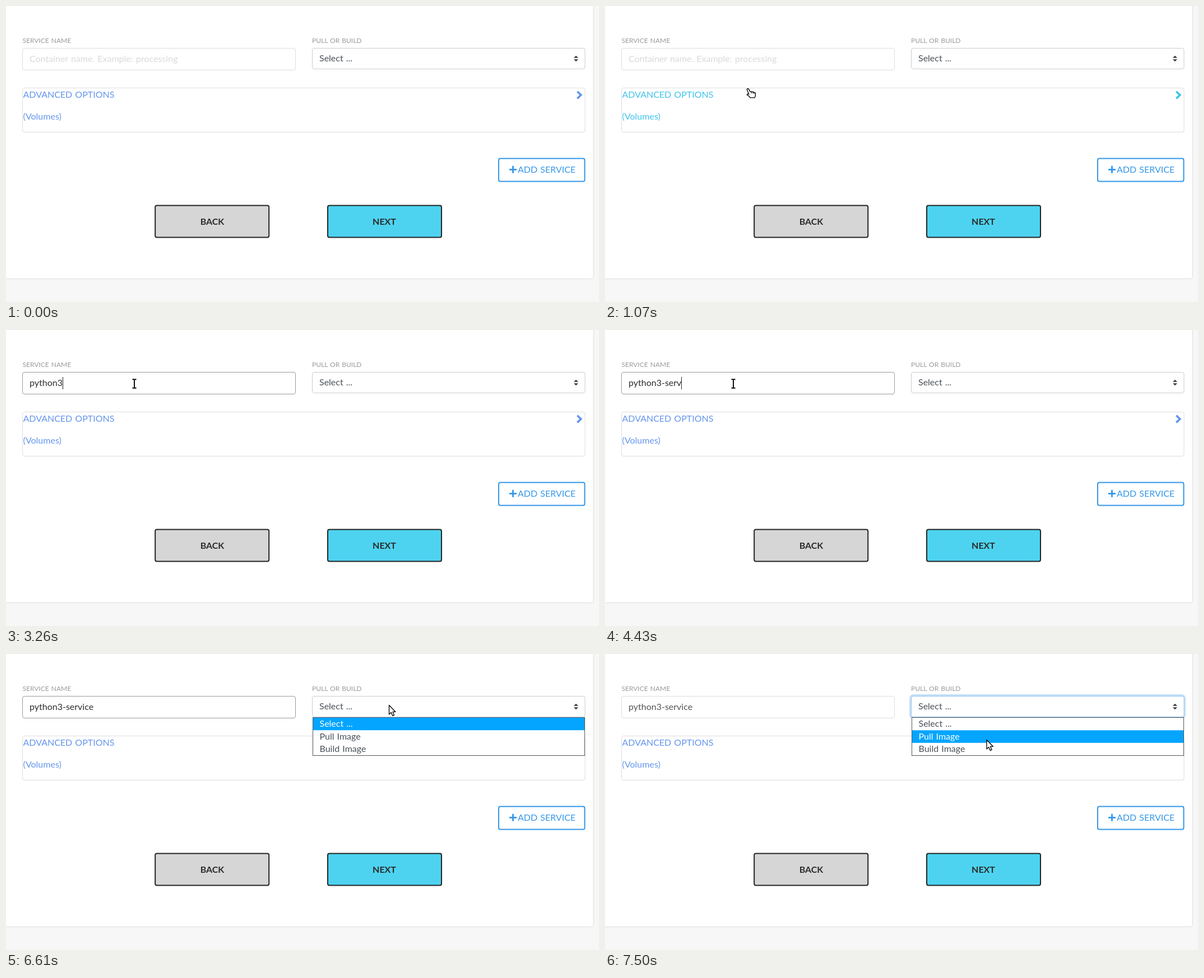
Write an HTML page that moves like this. It is 1058 px wide and 529 px high and loops after 8 s.

```html
<!DOCTYPE html>
<html lang="en">
<head>
<meta charset="utf-8">
<title>Service form</title>
<style>
  html, body { margin: 0; width: 100%; height: 100%; overflow: hidden; background: #f7f7f7; }
  svg { display: block; width: 1058px; height: 529px; }
  text { font: 16px Lato, "Open Sans", sans-serif; word-spacing: 1px; white-space: pre; fill: #495057; }
  .label { font-size: 12px; fill: #9a9a9a; }
  .bold { font-weight: 700; fill: #2b2b2b; text-anchor: middle; }
  .box { fill: #fff; stroke: #ddd; }
  .button { stroke: #242424; stroke-width: 2; }
  .blue { fill: #3498e8; }
  .line { fill: none; stroke: #3498e8; stroke-width: 2; }
  #link { color: #6495ed; }
  #link text { fill: currentColor; }
  #link path { fill: none; stroke: currentColor; stroke-width: 3.6; }
  #hand path, #arrow path { fill: #fff; stroke: #000; stroke-width: 1.3; stroke-linejoin: round; }
</style>
</head>
<body>
<svg viewBox="0 0 1058 529">
  <rect class="box" x="-10" y="-10" width="1058.5" height="497.5" rx="4"/>

  <text class="label" x="29.5" y="66">SERVICE NAME</text>
  <rect class="box" id="input" x="29.5" y="75.5" width="487" height="39" rx="3.5"/>
  <text id="hint" x="42" y="100" style="fill:#dadada">Container name. Example: processing</text>
  <text id="value" x="42" y="100"></text>
  <path id="squiggle" fill="none" stroke="#f03030"/>
  <rect id="caret" y="84" width="1" height="22" fill="#222"/>

  <text class="label" x="546" y="66">PULL OR BUILD</text>
  <rect id="ring" x="545" y="74" width="489" height="40" rx="5" fill="none" stroke="#3490dc" stroke-opacity=".28" stroke-width="4"/>
  <rect class="box" id="select" x="546.5" y="75.5" width="486.5" height="37" rx="3.5"/>
  <text x="559" y="99">Select ...</text>
  <path d="M1013 92.7 1017 88.8 1021 92.7ZM1013 95.3 1017 99.2 1021 95.3Z" fill="#343a40"/>

  <rect class="box" x="29.5" y="146.5" width="1003.5" height="79" rx="3.5"/>
  <g id="link">
    <text x="30.5" y="164">ADVANCED OPTIONS</text>
    <text x="30.5" y="203">(Volumes)</text>
    <path d="M1019.3 152.8 1025.8 159.1 1019.3 165.4"/>
  </g>

  <rect class="line" x="879" y="272.5" width="153.5" height="41" rx="3"/>
  <path class="line" style="stroke-width:2.8" d="M898 292.3H911M904.5 285.8V298.8"/>
  <text class="blue" style="fill:#3498e8" x="913" y="298">ADD SERVICE</text>

  <rect class="button" x="266.2" y="356.5" width="203" height="57" rx="3" fill="#d6d6d6"/>
  <text class="bold" x="368" y="390.5">BACK</text>
  <rect class="button" x="574" y="356.5" width="203" height="57" rx="3" fill="#4dd3f0"/>
  <text class="bold" x="675" y="390.5">NEXT</text>

  <g id="menu">
    <rect x="547.5" y="113.5" width="485" height="68" fill="#fff" stroke="#555"/>
    <rect id="mark" x="548" width="484" height="22.5" fill="#04a5ff"/>
    <text x="559.5" y="130">Select ...</text>
    <text x="559.5" y="152.5">Pull Image</text>
    <text x="559.5" y="175">Build Image</text>
  </g>

  <g id="arrow">
    <path d="M.5.5V16.8L4.2 13.4 6.9 19.4 9.6 18.2 7 12.3H11.8Z"/>
  </g>
  <g id="hand">
    <path d="M-2.5 1.2Q-2.4-.6-.6-.4L.8.6 3.3 5.4 6 5.2 8.5 5.6 11 6.4Q12.8 6.8 12.6 9V12.4L11.4 15.8H3.2L1.6 13.4-1.8 11.4Q-3.2 9.6-1.4 9.2L1 9.8Z"/>
    <path d="M6 5.4V8.4M8.7 6V8.8M11 7V9" style="stroke-width:1"/>
  </g>
  <g id="beam" fill="none">
    <path d="M-3.5-8H3.5M-3.5 8H3.5M0-8V8" stroke="#fff" stroke-width="4"/>
    <path d="M-3.5-7.8H-1L0-6.8 1-7.8H3.5M-3.5 7.8H-1L0 6.8 1 7.8H3.5M0-7V7" stroke="#000" stroke-width="1.9"/>
  </g>
</svg>
<script>
const LOOP = 8000;
const NAME = "python3-service";
const KEYS = [2600, 2670, 2790, 2930, 2990, 3130, 3260, 3750, 3940, 4130, 4190, 4430, 4500, 4590, 4880];
const CARET_ON = [[1340, 1880], [2600, 5480], [6060, 6610]];

// start, end, from, to, bend in y, easing
const MOVES = [
  [500, 1070, [1046, 452], [256, 148.5], 0, u => 1 - (1 - u) ** 1.7],
  [1070, 1290, [256, 148.5], [229, 95], 0, u => 1 - (1 - u) ** 2],
  [1880, 1881, [229, 95], [229, 96], 0, u => u],
  [5490, 5690, [229, 96], [683, 91], 34, u => u * u * (3 - 2 * u)],
  [7050, 7500, [683, 91], [680.5, 153], 0, u => u * u * (3 - 2 * u)]
];

const el = {};
document.querySelectorAll("[id]").forEach(e => el[e.id] = e);

const ramp = (t, a, b) => Math.min(1, Math.max(0, (t - a) / (b - a)));
const show = (e, on) => e.style.display = on ? "" : "none";
const mix = (a, b, u) => `rgb(${a.map((v, i) => Math.round(v + (b[i] - v) * u))})`;
const within = (v, a, b) => v >= a && v < b;

function pointer(t) {
  const [a, b, from, to, bend, ease] = MOVES.filter(m => t >= m[0]).pop();
  const u = ease(ramp(t, a, b));
  return [
    from[0] + (to[0] - from[0]) * u,
    from[1] + (to[1] - from[1]) * u + bend * Math.sin(Math.PI * u)
  ];
}

function drawPointer(t) {
  let kind = "", x = 0, y = 0;
  if (t >= 500) {
    [x, y] = pointer(t);
    kind = "arrow";
    if (within(x, 30, 1033) && within(y, 146, 226) && t < 6610) kind = "hand";
    else if (within(x, 30, 517) && within(y, 75, 115)) kind = "beam";
  }
  for (const k of ["arrow", "hand", "beam"]) show(el[k], k === kind);
  if (kind) el[kind].setAttribute("transform", `translate(${x} ${y})`);
  el.link.style.color = kind === "hand" ? "#3fc4ec" : "#6495ed";
  return y;
}

function drawInput(t) {
  const count = KEYS.filter(k => t >= k).length;
  const focus = ramp(t, 1340, 1640) - ramp(t, 6610, 6890);
  el.value.textContent = NAME.slice(0, count);
  el.value.style.fill = mix([85, 85, 85], [45, 45, 45], focus);
  el.input.style.stroke = mix([221, 221, 221], [154, 154, 154], focus);
  show(el.hint, !count);
  show(el.caret, CARET_ON.some(([a, b]) => within(t, a, b)));
  el.caret.setAttribute("x", Math.round(42 + (count ? el.value.getComputedTextLength() : 0)));

  show(el.squiggle, within(t, 5860, 6610));
  let d = "M42 103.5";
  for (let x = 44, up = true; x <= 101; x += 2, up = !up) d += `L${x} ${up ? 102.5 : 103.5}`;
  el.squiggle.setAttribute("d", d);
}

function drawSelect(t, y) {
  const focus = ramp(t, 6640, 6800);
  el.ring.style.opacity = focus;
  el.select.style.stroke = mix([204, 204, 204], [150, 195, 240], focus);
  show(el.menu, t >= 6610);
  const row = y >= 136 ? 1 : 0;
  el.mark.setAttribute("y", 113.7 + row * 22.6);
  el.menu.querySelectorAll("text").forEach((e, i) => e.style.fill = i === row ? "#fff" : "#495057");
}

function draw(t) {
  const y = drawPointer(t);
  drawInput(t);
  drawSelect(t, y);
}

const start = performance.now();
function tick() {
  draw((performance.now() - start) % LOOP);
  requestAnimationFrame(tick);
}
draw(0);
requestAnimationFrame(tick);
</script>
</body>
</html>
```
